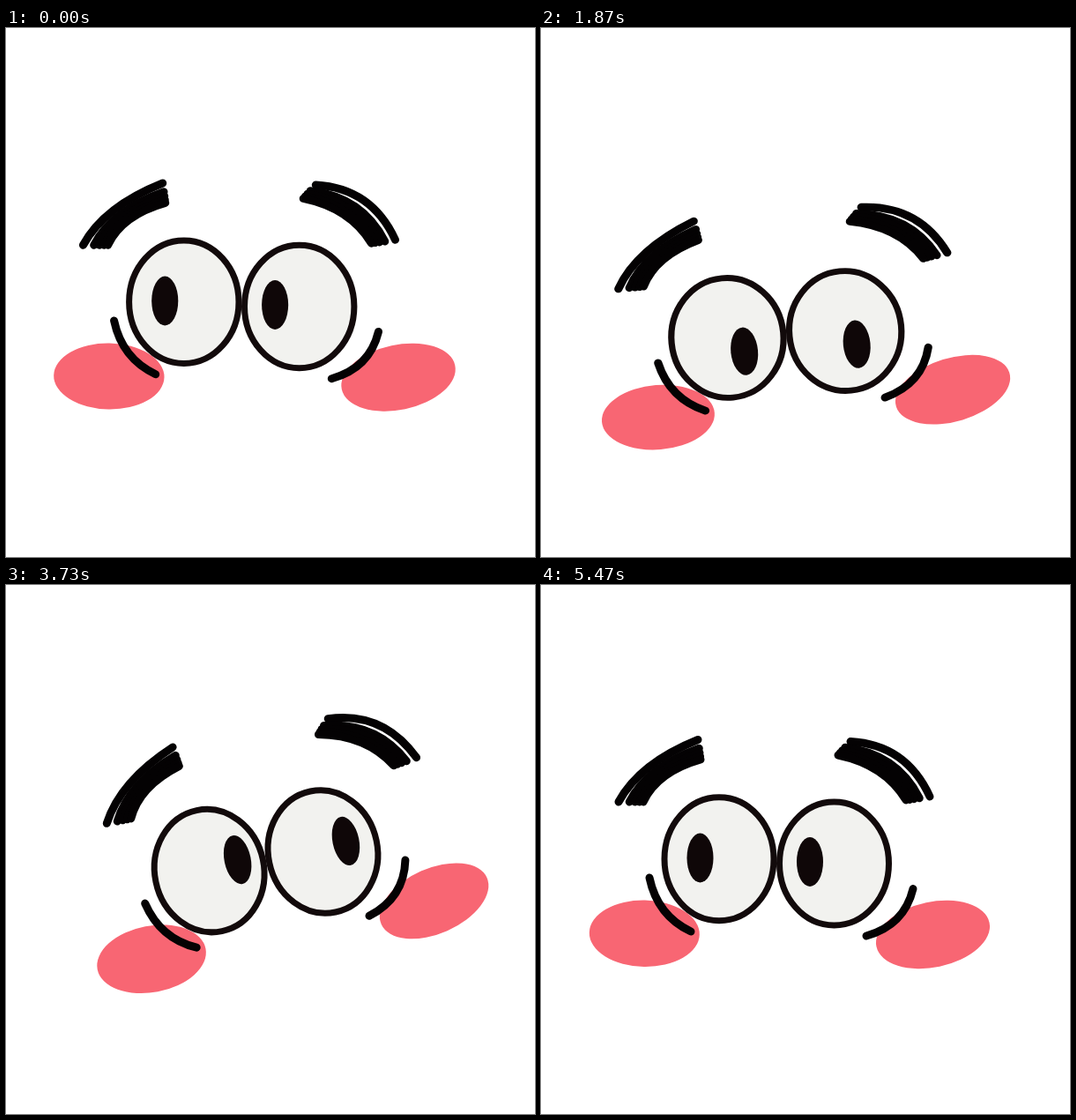
Animation, 600 px wide and 600 px high, one loop 5510 ms. Source, as an HTML page with a canvas:

```html
<!DOCTYPE html>
<html lang="en">
<head>
<meta charset="utf-8">
<title>Shy glance</title>
<style>
  html, body { margin: 0; width: 100%; height: 100%; overflow: hidden; background: #fff; }
  canvas { display: block; width: 100%; height: 100%; }
</style>
</head>
<body>
<canvas id="stage" width="600" height="600"></canvas>
<script>
const ctx = document.getElementById('stage').getContext('2d');

const PERIOD = 2755; // one glance to the right and back
const LEAD_IN = 100; // rest before the first crouch, carried over the loop seam
const ORIGIN = { x: 267, y: 313.5 };
const INK = '#040203', RIM = '#120a0b', PUPIL = '#0f0708', WHITE = '#f2f2ef', BLUSH = '#f86673';

// Each swing is the same crouch, leap and settle; only the look differs.
const there = { start: 120, lookFrom: 40, lookTo: 400, arc: -3 };
const back = { start: 1660, lookFrom: 200, lookTo: 500, arc: 27 };

const ease = p => (1 - Math.cos(Math.PI * Math.min(1, Math.max(0, p)))) / 2;
const mix = (a, b, p) => a + (b - a) * p;

// Cosine-eased run through [time, value] points.
const through = (...points) => u => points.reduce((value, [time, next], i) => {
  const from = i ? points[i - 1][0] : 0;
  return mix(value, next, ease((u - from) / (time - from)));
}, 0);

const hop = through([270, 38], [520, -21], [750, 6], [930, 0]);
const tip = through([160, 0.1], [530, 1.3], [760, 1.03], [1000, 1]);
const slide = through([100, 0], [500, 1.1], [1090, 1]);
const lift = through([200, 0], [780, 1], [1090, 0]);
const widen = through([150, 0], [400, 7], [900, 0]);

function pose(t) {
  const a = t - there.start, b = t - back.start;
  const both = f => f(a) + f(b);
  const change = f => f(a) - f(b);
  const lookA = ease((a - there.lookFrom) / (there.lookTo - there.lookFrom));
  const lookB = ease((b - back.lookFrom) / (back.lookTo - back.lookFrom));
  const look = lookA - lookB;
  const lean = change(tip);
  return {
    x: ORIGIN.x + 27.5 * change(slide),
    y: ORIGIN.y + both(hop),
    tilt: -11.8 * lean,
    stretch: 1 - 0.0017 * both(u => hop(u + 60)), // squash runs ahead of the hop
    px: 55.4 * look,
    py: -4.5 * look + there.arc * Math.sin(Math.PI * lookA) + back.arc * Math.sin(Math.PI * lookB),
    bx: 11 * lean,
    by: -7 * lean - 12 * both(lift),
    roll: 2 * both(lift),
    spread: 3 * lean + both(widen)
  };
}

function oval(x, y, rx, ry, fill, deg = 0, line = 0) {
  ctx.beginPath();
  ctx.ellipse(x, y, rx, ry, deg * Math.PI / 180, 0, Math.PI * 2);
  ctx.fillStyle = fill;
  ctx.fill();
  if (line) {
    ctx.strokeStyle = RIM;
    ctx.lineWidth = line;
    ctx.stroke();
  }
}

function curve(x0, y0, cx, cy, x1, y1) {
  ctx.beginPath();
  ctx.moveTo(x0, y0);
  ctx.quadraticCurveTo(cx, cy, x1, y1);
  ctx.strokeStyle = INK;
  ctx.lineWidth = 9;
  ctx.lineCap = 'round';
  ctx.stroke();
}

// Brush strokes between an outer and an inner curve, denser toward the inner one.
function brow(outer, inner, strokes = 5) {
  for (let i = 0; i < strokes; i++) {
    const p = Math.pow(i / (strokes - 1), 0.6);
    curve(...outer.map((v, k) => mix(v, inner[k], p)));
  }
}

function place(x, y, tilt, stretch, draw) {
  ctx.save();
  ctx.translate(x, y);
  ctx.rotate(tilt * Math.PI / 180);
  ctx.scale(Math.pow(stretch, -0.85), stretch);
  ctx.translate(-ORIGIN.x, -ORIGIN.y);
  draw();
  ctx.restore();
}

function drawFace(px, py) {
  oval(117.3, 395.3, 62.5, 37.7, BLUSH, 1);
  oval(444.5, 396.5, 65.5, 37, BLUSH, -12);
  for (const [x, y] of [[202, 310.7], [332.5, 316]]) oval(x, y, 62, 70, WHITE, 0, 7);
  for (const [x, y] of [[180.5, 309.5], [305, 314]]) oval(x + px, y + py, 15, 28, PUPIL);
  curve(123, 332, 132, 375, 170, 393);
  curve(422, 344.5, 412, 386, 369, 398);
}

function drawBrows(spread) {
  ctx.translate(-spread, 0);
  brow([88, 246, 112, 202, 178, 175.5], [116, 246, 132, 212, 181, 198]);
  ctx.translate(spread * 2, 0);
  brow([351, 177.5, 414, 181, 441, 240], [337, 193, 390, 204, 414, 244]);
}

function draw(now) {
  const p = pose((now + LEAD_IN) % PERIOD);
  ctx.fillStyle = '#fff';
  ctx.fillRect(0, 0, 600, 600);
  place(p.x, p.y, p.tilt, p.stretch, () => drawFace(p.px, p.py));
  place(p.x + p.bx, p.y + p.by, p.tilt + p.roll, p.stretch, () => drawBrows(p.spread));
}

const start = performance.now();
function tick() {
  draw(performance.now() - start);
  requestAnimationFrame(tick);
}
tick();
</script>
</body>
</html>
```
